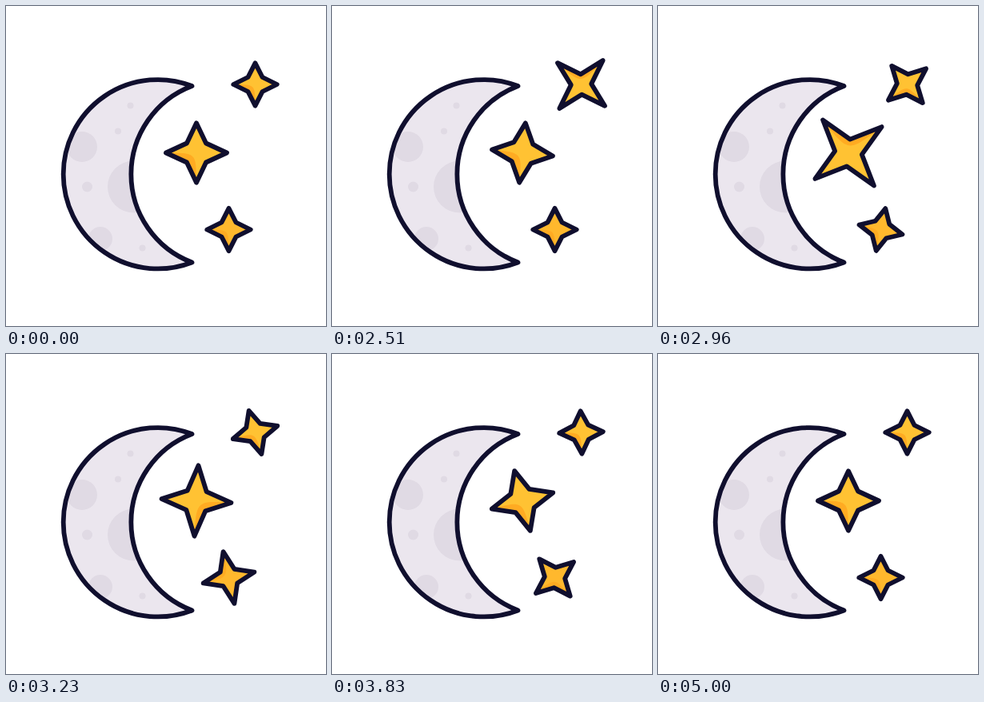
An HTML page that plays this animation: 400x400 px, repeating every 5.12 s.

```html
<!DOCTYPE html>
<html lang="en">
<head>
<meta charset="utf-8">
<title>Moon and stars</title>
<style>
  html, body { margin: 0; width: 100%; height: 100%; overflow: hidden; background: #fff; }
  svg { display: block; width: 100%; height: 100%; }
  .line { fill: none; stroke: #100f2e; stroke-width: 5.8; stroke-linejoin: round; }
  .moon { fill: #ebe6ee; }
  .crater { fill: #e0dae4; }
  .shade { fill: #ffab22; }
</style>
</head>
<body>
<svg viewBox="0 0 400 400">
  <defs>
    <path id="crescent" d="M232.5 100A118.2 118.2 0 1 0 232.5 320.5A117.9 117.9 0 0 1 232.5 100Z"/>
    <clipPath id="inside"><use href="#crescent"/></clipPath>
  </defs>
  <use href="#crescent" class="moon"/>
  <g class="crater" clip-path="url(#inside)">
    <circle cx="95" cy="176" r="19"/>
    <circle cx="159.5" cy="226" r="32.5"/>
    <circle cx="118" cy="291" r="15"/>
    <circle cx="101.5" cy="226" r="6.5"/>
    <circle cx="155.5" cy="124.5" r="4"/>
    <circle cx="140" cy="156.5" r="4"/>
    <circle cx="170.5" cy="302.5" r="4"/>
  </g>
  <use href="#crescent" class="line"/>
  <g id="sky"></g>
</svg>
<script>
const LOOP = 5120, BEGIN = 2030, END = 5000, STEP = 30;

// rx, ry: tip reach; notch: inner corner offset; rise: ms to the half turn; slow: stretch of the settling
const stars = [
  { x: 311.5, y: 98, rx: 27.2, ry: 26.6, notch: 9, gold: "#ffc233", start: 2000, rise: 595, slow: 1 },
  { x: 238, y: 183.5, rx: 38, ry: 37.2, notch: 12, gold: "#ffc233", start: 2394, rise: 637, slow: 1.2 },
  { x: 278.5, y: 279.5, rx: 27.2, ry: 26.6, notch: 9, gold: "#ffb82d", start: 2780, rise: 684, slow: 1 }
];

function add(parent, tag, cls) {
  const el = document.createElementNS("http://www.w3.org/2000/svg", tag);
  if (cls) el.setAttribute("class", cls);
  return parent.appendChild(el);
}

for (const s of stars) {
  s.group = add(document.getElementById("sky"), "g");
  s.group.setAttribute("fill", s.gold);
  s.parts = ["body", "shade", "line"].map(cls => add(s.group, "path", cls));
}

// Spin speeds up to a half turn while the tips grow, then settles slowly.
function pose(s, time) {
  const t = time - s.start;
  if (t <= 0 || time >= END) return { angle: 0, grow: 0 };
  if (t < s.rise) {
    const u = t / s.rise;
    return { angle: 180 * u ** 2, grow: 21 * u ** 3 };
  }
  const after = (t - s.rise) / s.slow;
  const rest = Math.max(0, 1 - after / 1600);
  return {
    angle: 360 - 150 * Math.exp(-after / 190) - 30 * rest ** 2,
    grow: 13.5 * Math.exp(-after / 60) + 7.5 * rest ** 3
  };
}

function drawStar(s, time) {
  const { angle, grow } = pose(s, time);
  const a = s.rx + grow, b = s.ry + grow, n = s.notch;
  const outline = `M0 ${-b}L${n} ${-n}L${a} 0L${n} ${n}L0 ${b}L${-n} ${n}L${-a} 0L${-n} ${-n}Z`;
  const shade = `M${-a} 0L${-n} ${n}L0 ${b}C0 0 0 0 ${-a} 0Z`;
  s.group.setAttribute("transform", `translate(${s.x} ${s.y}) rotate(${angle})`);
  [outline, shade, outline].forEach((d, i) => s.parts[i].setAttribute("d", d));
}

function frame() {
  const t = performance.now() % LOOP;
  const time = t < BEGIN ? 0 : BEGIN + Math.floor((t - BEGIN) / STEP) * STEP;
  for (const s of stars) drawStar(s, time);
  requestAnimationFrame(frame);
}
frame();
</script>
</body>
</html>
```
